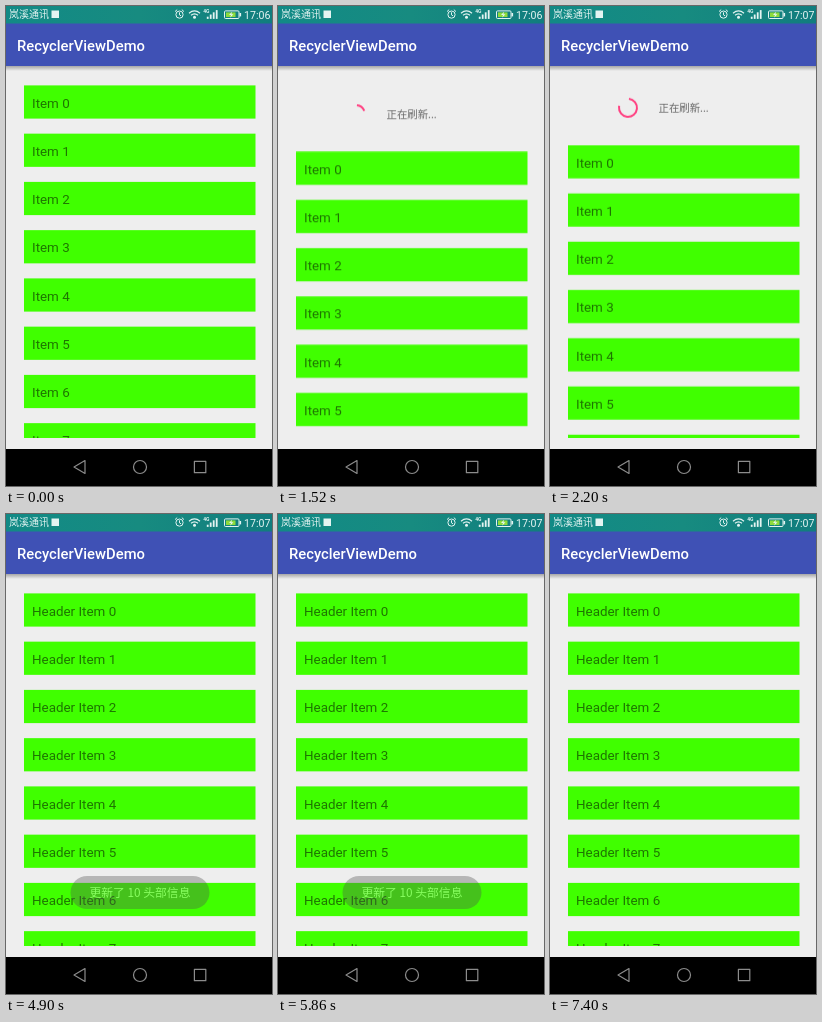
An HTML page for the animation above (8000 ms loop, 266x480 px).

```html
<!DOCTYPE html>
<html lang="zh">
<head>
<meta charset="utf-8">
<title>RecyclerViewDemo</title>
<style>
  html, body { margin: 0; width: 100%; height: 100%; overflow: hidden; background: #eee; }
  svg { display: block; width: 100%; height: 100%; }
  text { font-family: Roboto, "Noto Sans CJK SC", "Noto Sans CJK", sans-serif; white-space: pre; }
  .cjk { font-family: "Noto Sans CJK SC", "Noto Sans CJK", sans-serif; }
  .row rect { fill: #40ff00; }
  .row text { font-size: 13.4px; fill: #000; fill-opacity: .54; }
  .line { fill: none; stroke: #e4f4f2; }

  .pull, .before, .after, .old-time, .new-time, .arc, .toast {
    animation: 8s step-end infinite;
  }
  .pull { animation-name: pull; }
  .before { animation-name: before; }
  .after { animation-name: after; }
  .old-time { animation-name: old-time; }
  .new-time { animation-name: new-time; }
  .arc { animation-name: arc; }
  .toast { animation-name: toast; }

  @keyframes pull {
    0% { transform: translateY(0); }
    6.25% { transform: translateY(66.2px); }
    27.5% { transform: translateY(59.8px); }
    45%, 100% { transform: translateY(0); }
  }
  @keyframes before { 0% { opacity: 1; } 45%, 100% { opacity: 0; } }
  @keyframes after { 0% { opacity: 0; } 45%, 100% { opacity: 1; } }
  @keyframes old-time { 0% { opacity: 1; } 27.5%, 100% { opacity: 0; } }
  @keyframes new-time { 0% { opacity: 0; } 27.5%, 100% { opacity: 1; } }
  @keyframes arc {
    0% { stroke-dasharray: 17 83; }
    27.5%, 100% { stroke-dasharray: 77 23; }
  }
  @keyframes toast {
    0% { opacity: 0; }
    45% { opacity: 1; }
    61.25% { opacity: .38; }
    81.25%, 100% { opacity: 0; }
  }
</style>
</head>
<body>
<svg viewBox="0 0 266 480">
  <defs>
    <linearGradient id="status">
      <stop offset="0" stop-color="#128a86"/>
      <stop offset=".5" stop-color="#178b80"/>
      <stop offset="1" stop-color="#117d7e"/>
    </linearGradient>
    <linearGradient id="shade" x2="0" y2="1">
      <stop offset="0" stop-color="#000" stop-opacity=".3"/>
      <stop offset="1" stop-color="#000" stop-opacity="0"/>
    </linearGradient>
    <clipPath id="window"><rect y="65" width="266" height="366.3"/></clipPath>
  </defs>

  <rect width="266" height="480" fill="#eee"/>

  <g clip-path="url(#window)">
    <g class="pull">
      <g class="before">
        <circle class="arc" cx="78" cy="42" r="9" pathLength="100" fill="none"
                stroke="#ff4081" stroke-width="2" transform="rotate(-84 78 42)"/>
        <text class="cjk" x="108.5" y="45.8" font-size="10.4" fill="#666">正在刷新...</text>
      </g>
      <g class="before" id="items"></g>
      <g class="after" id="headers"></g>
    </g>
  </g>

  <!-- App bar -->
  <rect y="60" width="266" height="5" fill="url(#shade)"/>
  <rect y="17" width="266" height="43" fill="#3f51b5"/>
  <text x="11" y="44.5" font-size="14.8" font-weight="500" fill="#fff">RecyclerViewDemo</text>

  <!-- Status bar -->
  <rect width="266" height="17.5" fill="url(#status)"/>
  <g fill="#e4f4f2">
    <text class="cjk" x="3" y="12.4" font-size="10">岚溪通讯</text>
    <rect x="45.5" y="4.5" width="7.5" height="7.5"/>
    <g class="line">
      <circle cx="173.5" cy="8.6" r="3.6"/>
      <path d="M173.5 6.3v2.6l1.6 1M169 5.6l2.2-2M178 5.6l-2.2-2"/>
      <path d="M183 7.2q5.5-4.6 11 0M185 9.3q3.5-2.8 7 0" stroke-width="1.2"/>
    </g>
    <circle cx="188.5" cy="11.3" r="1.5"/>
    <text x="197.2" y="6.6" font-size="5" font-weight="700">4G</text>
    <g id="bars"></g>
    <rect class="line" x="218.5" y="4.9" width="14.5" height="7.6" rx="1"/>
    <rect x="233.5" y="7" width="1.6" height="3.4"/>
    <rect x="220" y="6.4" width="9.5" height="4.6" fill="#8ddb3c"/>
    <path d="M226 5.8l-3 3.3h2l-.8 2.6 3.2-3.5h-2z"/>
    <g font-size="10.6">
      <text class="old-time" x="238" y="12.5">17:06</text>
      <text class="new-time" x="238" y="12.5">17:07</text>
    </g>
  </g>

  <!-- Toast -->
  <g class="toast">
    <rect x="64.5" y="362" width="139" height="33" rx="16.5" fill="#505050" fill-opacity=".93"/>
    <text class="cjk" x="83.5" y="382.8" font-size="11.8" fill="#fff">更新了 10 头部信息</text>
  </g>

  <!-- Navigation bar -->
  <rect y="443" width="266" height="37"/>
  <g fill="none" stroke="#8c8c8c" stroke-width="1.2" stroke-linejoin="round">
    <path d="M79 454.6v12.8L68 461z"/>
    <circle cx="134" cy="461" r="6.5"/>
    <rect x="188.4" y="455.3" width="11.4" height="11.4"/>
  </g>
</svg>
<script>
  const pitch = 48.25;

  function fillList(id, label) {
    let rows = '';
    for (let i = 0; i < 8; i++) {
      rows += `<g class="row" transform="translate(18 ${79.4 + i * pitch})">
        <rect width="231.5" height="33.2"/>
        <text x="8" y="22.2">${label} ${i}</text></g>`;
    }
    document.getElementById(id).innerHTML = rows;
  }

  fillList('items', 'Item');
  fillList('headers', 'Header Item');

  let bars = '';
  for (let i = 0; i < 4; i++) {
    const h = 2.2 + i * 2.2;
    bars += `<rect x="${200.8 + i * 3}" y="${12.9 - h}" width="1.8" height="${h}"/>`;
  }
  document.getElementById('bars').innerHTML = bars;
</script>
</body>
</html>
```
